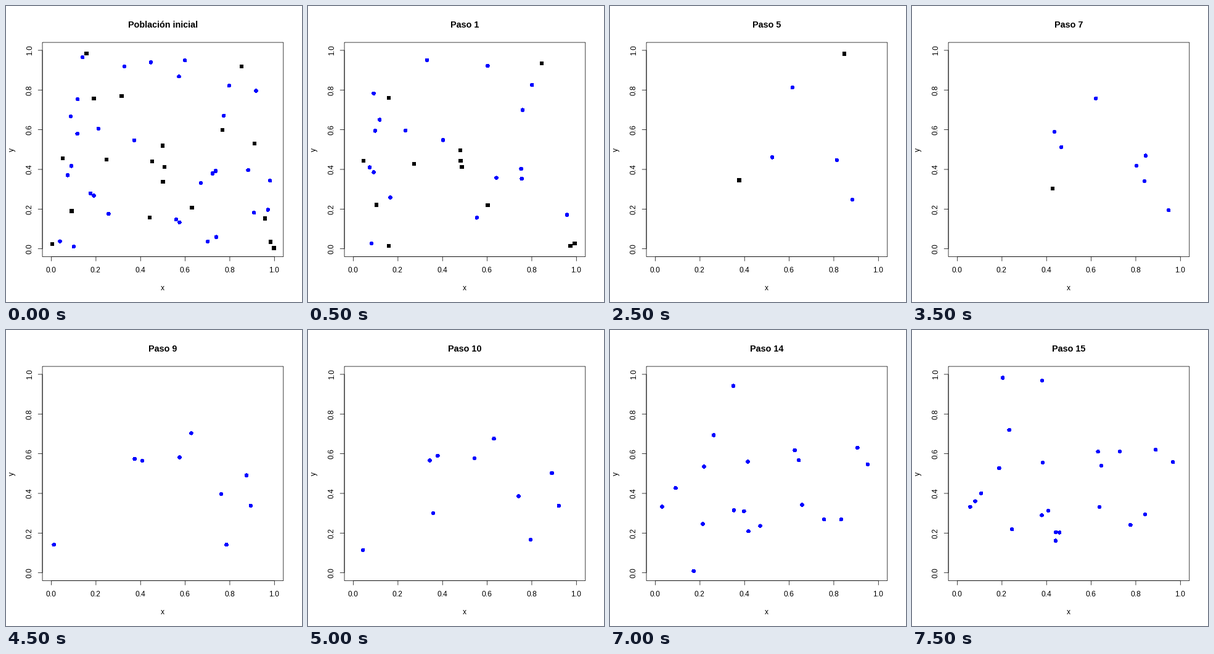
Recreate the animation shown at these times as a matplotlib script. Size 480 by 480 pixels, loop 8000 ms.

```python
import random

import matplotlib.pyplot as plt
import numpy as np
from matplotlib.animation import FuncAnimation
from matplotlib.collections import PolyCollection

SIZE, STEPS = 480, 16
LAST = STEPS - 1
# Plot box in pixels from the top left; the data range leaves 4 % on each side
LEFT, RIGHT, TOP, BOTTOM = 59.04, 449.76, 59.04, 406.56
W, H = (RIGHT - LEFT) / 1.08, (BOTTOM - TOP) / 1.08
X0, Y1 = LEFT + 0.04 * W, TOP + 0.04 * H
TICK, LINE, R = 7.2, 0.75, 2.7

plt.rcParams["font.family"] = "Liberation Sans"
rng = random.Random(11)


class Dot:
    """Moves at constant speed on a torus while it is alive."""

    def __init__(self, x, y, vx, vy, first=0, last=LAST):
        self.pos, self.v = np.array([x, y]), np.array([vx, vy])
        self.first, self.last = first, last

    def at(self, step):
        p = self.pos + self.v * (step - self.first)
        return (p - (X0, Y1)) % (W, H) + (X0, Y1)


def stray(first=0, last=LAST):
    """A dot with a random place and a speed of up to 1/30 of the range."""
    return Dot(X0 + W * rng.random(), Y1 + H * rng.random(),
               W * rng.uniform(-1, 1) / 30, H * rng.uniform(-1, 1) / 30,
               first, last)


def short_lived(n):
    """Half of the dots are gone after each step."""
    return [stray(last=int(np.log2(n / (i + 1)))) if i > n // 8 else stray(last=2)
            for i in range(n)]


# Start, speed and life of the dots that stay for longer
squares = [
    Dot(92, 247, -1.9, 4, last=4),
    Dot(163, 249, 9.3, 6.7, last=8),
    Dot(254, 226.5, -7.2, 7.8, last=4),
    Dot(75.3, 386.3, -11.4, 2.6, last=5),
    Dot(382, 98, -3.3, -5, last=3),
] + short_lived(14)

discs = [
    Dot(290.2, 88.3, 1.13, 8.78),
    Dot(316, 287, -10.56, -8.32),
    Dot(340, 267.5, 5.55, -3.55),
    Dot(335, 271.5, 11.6, 8.52),
    Dot(192, 98, 1, -10.27, last=4),
    Dot(242.2, 201.5, -11.2, 2.5, first=6),
    Dot(371.5, 255.5, -7.5, 3.5, first=6),
    Dot(377, 284, 9.9, 0.35, first=7),
    Dot(293.2, 205.2, -11.6, 1.4, first=8),
    Dot(357.5, 348.2, 3.45, -8.2, first=9),
    Dot(203, 297, 3.6, -0.8, first=10),
    Dot(167, 116.7, 11, -8.7, first=11),
    Dot(127, 297, 11.7, 8.7, first=12),
    Dot(414, 184, -6.3, 3.4, first=12),
] + short_lived(26)
discs += [stray(first=s) for s in range(13, STEPS) for _ in range(3)]

# At 72 dpi one point is one pixel
fig = plt.figure(figsize=(SIZE / 72, SIZE / 72), dpi=72, facecolor="white")
ax = fig.add_axes([0, 0, 1, 1])
ax.set_xlim(0, SIZE)
ax.set_ylim(SIZE, 0)
ax.axis("off")


def line(xs, ys):
    ax.plot(xs, ys, color="black", lw=LINE, snap=False,
            solid_capstyle="butt", solid_joinstyle="miter")


def label(x, y, s, size=12, **kw):
    return ax.text(x, y, s, fontsize=size, ha="center", va="baseline",
                   rotation_mode="anchor", **kw)


line([LEFT, RIGHT, RIGHT, LEFT, LEFT], [TOP, TOP, BOTTOM, BOTTOM, TOP])
line([X0, X0 + W], [BOTTOM, BOTTOM])
line([LEFT, LEFT], [Y1, Y1 + H])
for i in range(6):
    x, y, s = X0 + W * i / 5, Y1 + H * (1 - i / 5), f"{i / 5:.1f}"
    line([x, x], [BOTTOM, BOTTOM + TICK])
    line([LEFT - TICK, LEFT], [y, y])
    label(x - 0.5, 432, s)
    label(41.8, y, s, rotation=90)

cx, cy = (LEFT + RIGHT) / 2, (TOP + BOTTOM) / 2
label(cx - 0.5, 461, "x")
label(12.9, cy, "y", rotation=90)
title = label(cx, 35.2, "", size=14.4, fontweight="bold")


def ring(n, radius, turn=0.0):
    a = 2 * np.pi * (np.arange(n) + turn) / n
    return radius * np.column_stack([np.cos(a), np.sin(a)])


def group(dots, shape, color):
    art = PolyCollection([], facecolors=color, linewidths=0, antialiaseds=False)
    art.set_snap(False)
    ax.add_collection(art, autolim=False)
    return dots, shape, art


groups = [
    group(squares, ring(4, R * 2 ** 0.5, 0.5), "black"),
    group(discs, ring(32, R), "#0000ff"),
]


def draw(step):
    title.set_text(f"Paso {step}" if step else "Población inicial")
    for dots, shape, art in groups:
        art.set_verts([shape + d.at(step) for d in dots
                       if d.first <= step <= d.last])
    return [title] + [art for _, _, art in groups]


anim = FuncAnimation(fig, draw, frames=STEPS, init_func=lambda: draw(0),
                     interval=500, repeat=True, repeat_delay=0, blit=False)
plt.show()
```
